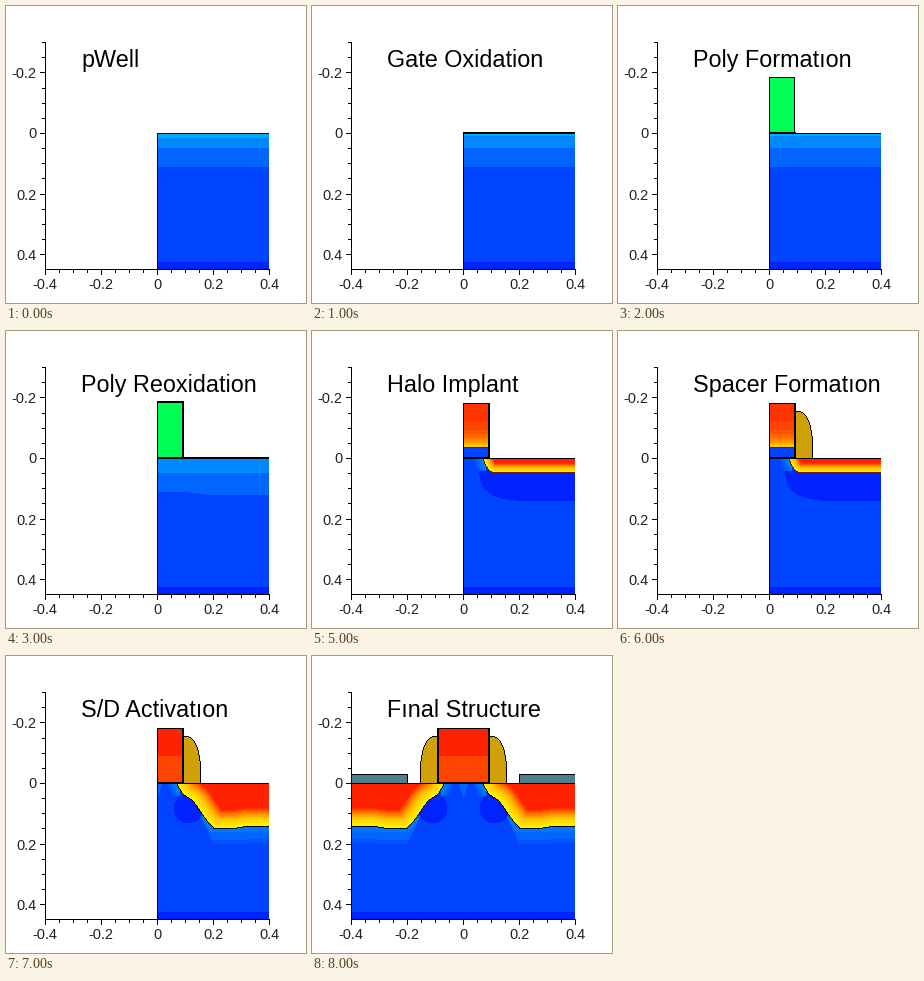
A matplotlib script for the animation above (9000 ms loop, 300 by 297 pixels).

```python
import numpy as np
import matplotlib.pyplot as plt
from matplotlib.animation import FuncAnimation

W, H, DPI = 300, 297, 100
PX = 72 / DPI                                  # one pixel in points
LEFT, RIGHT, TOP, BASE = 39, 263, 36, 263      # plot frame
MID, SURF = 151, 127                           # symmetry axis, silicon surface

TITLES = ["pWell", "Gate Oxidation", "Poly Formatıon", "Poly Reoxidation",
          "LDD Implant", "Halo Implant", "Spacer Formatıon", "S/D Activatıon",
          "Fınal Structure"]
WELL, OXIDE, POLY, REOX, LDD, HALO, SPACER, ACTIVE, FINAL = range(len(TITLES))

BLACK, BROWN = (0, 0, 0), (112, 24, 0)
NITRIDE, METAL = (208, 160, 8), (78, 126, 146)

X, Y = np.meshgrid(np.arange(W), np.arange(H))
R = np.abs(X - MID) + MID                      # mirrored onto the right half
DEPTH = Y - SURF


def rainbow(level):
    """0 is blue, 7.5 cyan, 15 green, 22.5 yellow, 30 red."""
    bands = np.round(level * 2) / 2
    rgb = np.stack([bands - 15, np.minimum(bands, 30 - bands), 15 - bands], axis=-1)
    return 34 * np.clip(rgb, 0, 7.5)


def corner(x, x0, width, depth, p):
    """Depth of a flat profile with a rounded left end."""
    u = np.clip((x - x0) / width, 0, 1)
    return depth * (1 - (1 - u) ** p) ** (1 / p)


def slope(x):
    """Depth of the deep junction: a wavy ramp, then almost flat."""
    u = np.clip((x - 170) / 37, 0, 1)
    wave = 0.08 * (1 - u) * np.sin(3 * np.pi * u)
    return 45 * (u + wave) - 1.5 * np.clip((x - 230) / 10, 0, 1)


def junction(stage):
    """Depth function, left end and width of the colour ramp."""
    if stage == LDD:
        return lambda x: corner(x, 172, 9, 23.5, 1.5), 172, 19
    if stage < ACTIVE:
        return lambda x: corner(x, 170.5, 10, 14.5, 1.5), 170.5, 10
    return slope, 170, 19


def distance(curve, x0):
    best = np.full(R.shape, 1e3)
    for x in x0 + (W - x0) * np.linspace(0, 1, 250) ** 2:
        best = np.minimum(best, np.hypot(R - x, DEPTH - curve(x)))
    return best


def edge(mask):
    """Pixels of the mask that touch its outside."""
    inner = mask.copy()
    for axis in (0, 1):
        for step in (-1, 1):
            inner &= np.roll(mask, step, axis)
    return mask & ~inner


def substrate(stage):
    """Doping level of the silicon and the mask of its implanted part."""
    sag = 3 * np.clip((R - 175) / 25, 0, 1) if stage >= REOX else 0
    steps = [14, 33 + sag] + ([4] if stage == WELL else [2] if stage < REOX else [])
    level = 2.0 + sum(DEPTH <= s for s in steps)
    if stage > LDD:
        level[:] = 2
    level[DEPTH >= 129] = 1
    if stage < LDD:
        return level, np.zeros(R.shape, bool)

    curve, x0, ramp = junction(stage)
    d = distance(curve, x0)
    if stage in (HALO, SPACER):
        level[(DEPTH > 11) & (DEPTH < corner(R, 166.5, 80, 43, 4))] = 1
    elif stage >= ACTIVE:
        strip = (R > 200 + 0.45 * (DEPTH - 45)) & (d < 16)
        level[strip] = 3.5 - d[strip] / 16
        level[R - MID < (15 - DEPTH) / 3] = 3
        level[np.hypot(R - 182, Y - 152) < 15] = 1
    tip = (R < 174) & (DEPTH < 13) & (d < 9)
    level[tip] = np.maximum(level, 4 - d / 5)[tip]
    doped = (R >= x0) & (DEPTH >= 0) & (DEPTH <= curve(R))
    hot = 23 + 6 * np.minimum(d / ramp, 1) ** 2
    return np.where(doped, hot, level), doped


def fade(y0, y1, start, drop, p):
    return start - drop * np.clip((Y - y0) / (y1 - y0), 0, 1) ** p


def gate(stage):
    """Doping level of the gate and the mask of its junction line."""
    none = np.zeros(R.shape, bool)
    if stage < LDD:
        return np.full(R.shape, 12.5), none
    if stage == LDD:
        lobe = (Y >= 98) & (R > 171 + 2.5 * np.cos(3 * np.pi * (Y - 98) / 28))
        level = np.where(lobe, 18, 11)
        return np.where(Y < 98, fade(71, 99, 29, 14, 2), level), edge(lobe) | (Y == 98)
    if stage < ACTIVE:
        return np.where(Y < 116, fade(71, 116, 28.4, 5, 4), 2), Y == 116
    return np.where(Y < 100, 29, 28), none


def paint(stage):
    top = SURF if stage < POLY else 71 if stage < HALO else 72
    poly = (R <= 176) & (Y >= top) & (Y <= SURF)
    level, doped = substrate(stage)
    rgb = rainbow(level)
    rgb[DEPTH < 0] = 255
    rgb[edge(doped)] = BROWN if stage < ACTIVE else BLACK

    if stage >= POLY:
        fill, seam = gate(stage)
        rgb[poly] = rainbow(fill)[poly]
        rgb[poly & seam] = BROWN
        rgb[edge(poly)] = BLACK
        rgb[(R <= 177) & (Y >= SURF - 1) & (Y <= SURF)] = BLACK
    if stage >= REOX:
        rgb[(R >= 176) & (R <= 177) & (Y >= top) & (Y <= SURF)] = BLACK
    if stage in (REOX, LDD):
        rgb[(R <= 177) & (Y >= top - 1) & (Y <= top)] = BLACK
    if stage >= SPACER:
        height = np.clip(-DEPTH / 48, 0, 1)
        side = (R > 176) & (DEPTH <= 0) & (DEPTH >= -48)
        side &= R <= 177 + 18 * (1 - height ** 2.6) ** (1 / 2.6)
        rgb[side] = NITRIDE
        rgb[edge(side)] = BLACK
    if stage == FINAL:
        contact = (R >= 207) & (Y >= 118) & (Y <= SURF)
        rgb[contact] = METAL
        rgb[edge(contact)] = BLACK
    thick = stage in (OXIDE, REOX, LDD)
    rgb[(DEPTH <= 0) & (DEPTH >= -thick)] = BLACK

    if stage < FINAL:
        rgb[(X == MID) & (Y >= top)] = BLACK
        rgb[X < MID] = 255
    rgb[(X < LEFT) | (X >= RIGHT) | (Y > BASE)] = 255
    draw_axes(rgb)
    return rgb.astype(np.uint8)


def x_tick(k):
    return MID + 14 * k


def y_tick(k):
    return round(SURF + 15.15 * k)


def draw_axes(rgb):
    rgb[TOP:BASE + 1, LEFT] = BLACK
    rgb[BASE, LEFT:RIGHT + 1] = BLACK
    for k in range(-8, 9):
        rgb[BASE:BASE + (4 if k % 4 else 6), x_tick(k)] = BLACK
    for k in range(-6, 9):
        rgb[y_tick(k), LEFT - (3 if k % 4 else 5):LEFT] = BLACK


plt.rcParams["font.family"] = "Liberation Sans"
fig = plt.figure(figsize=(W / DPI, H / DPI), dpi=DPI, facecolor="white")
ax = fig.add_axes([0, 0, 1, 1])
ax.axis("off")

PICTURES = [paint(s) for s in range(len(TITLES))]
picture = ax.imshow(PICTURES[0], extent=(0, W, H, 0), interpolation="nearest",
                    aspect="auto")
title = ax.text(75, 61, "", size=23.4 * PX)

style = dict(size=14.5 * PX, color="#222222")
for k in range(-8, 9, 4):
    ax.text(x_tick(k), 283, f"{k / 20:g}", ha="center", **style)
for k in range(-4, 9, 4):
    ax.text(30.5, y_tick(k) + 5.5, f"{k / 20:g}", ha="right", **style)


def draw(i):
    picture.set_data(PICTURES[i])
    title.set_text(TITLES[i])
    return picture, title


anim = FuncAnimation(fig, draw, frames=len(TITLES), interval=1000, repeat=True)
plt.show()
```
